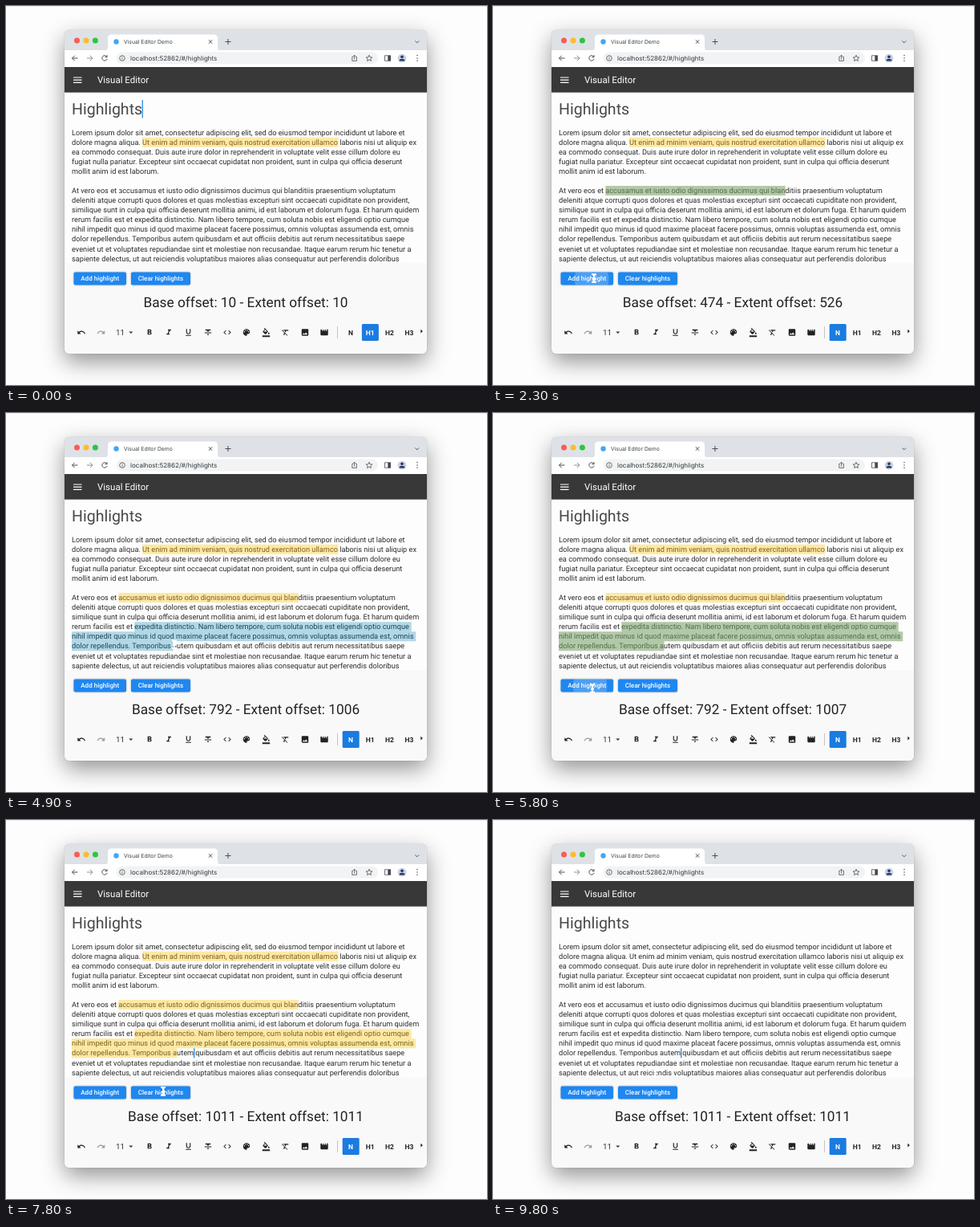
Animation, 600 px wide and 472 px high, one loop 9900 ms. Source, as an HTML page:

```html
<!DOCTYPE html>
<html lang="en">
<head>
<meta charset="utf-8">
<title>Visual Editor Demo</title>
<style>
html, body { margin: 0; width: 100%; height: 100%; overflow: hidden; background: #fdfdfd; }
.window { position: absolute; left: 73px; top: 30px; width: 452px; height: 403px; border-radius: 6px;
  box-shadow: 0 10px 28px rgba(0,0,0,.42), 0 0 1px rgba(0,0,0,.45); }
svg { position: absolute; left: 0; top: 0; }
text { font-family: Roboto, sans-serif; text-rendering: geometricPrecision; white-space: pre; }
.ui { font-family: Inter, sans-serif; }
.line { fill: none; stroke: #4a4d51; stroke-width: 1; }
.mid { text-anchor: middle; }
.btn { font-size: 8.05px; font-weight: 500; fill: #fff; }
.style { font-size: 8.5px; font-weight: 700; }
</style>
</head>
<body>
<div class="window"></div>
<svg width="600" height="472" viewBox="0 0 600 472">
  <defs>
    <clipPath id="frame"><rect x="73" y="30" width="452" height="403" rx="6"/></clipPath>
    <clipPath id="buttons">
      <rect x="84.5" y="331.5" width="65.5" height="16" rx="2"/>
      <rect x="156" y="331.5" width="74" height="16" rx="2"/>
    </clipPath>
  </defs>
  <rect width="600" height="1" fill="#e9edef"/>

  <g clip-path="url(#frame)">
    <rect x="73" y="30" width="452" height="26" fill="#dee1e6"/>
    <rect x="73" y="55" width="452" height="21" fill="#fff"/>
    <rect x="73" y="76" width="452" height="32" fill="#383838"/>
    <rect x="73" y="107.7" width="452" height="213" fill="#fdfdfd"/>
    <rect x="73" y="320" width="452" height="113" fill="#f9f9f9"/>
  </g>

  <!-- Tab strip -->
  <circle cx="88.5" cy="43" r="3.5" fill="#fc5b57"/>
  <circle cx="100" cy="43" r="3.5" fill="#fdbc2e"/>
  <circle cx="111.4" cy="43" r="3.5" fill="#29c73f"/>
  <path d="M122 56q5 0 5-5V40q0-4.500 4.500-4.500h128q4.500 0 4.500 4.500v11q0 5 5 5z" fill="#fff"/>
  <circle cx="137.500" cy="44.500" r="3.200" fill="#42a5f5"/>
  <text class="ui" x="147" y="47" font-size="6.8" fill="#3c4043">Visual Editor Demo</text>
  <path class="line" d="M252.800 42.300l4.400 4.400m0-4.400l-4.400 4.400M273.500 44.500h7m-3.500-3.500v7M510.500 43.500l2.300 2.300 2.300-2.300"/>

  <!-- Address bar -->
  <rect x="137.500" y="57.500" width="326.500" height="15" rx="7.500" fill="#f1f3f4"/>
  <path class="line" d="M89.500 65h-7m3.200-3.200l-3.200 3.200 3.200 3.200M125.800 63.300a3.200 3.200 0 1 0 .3 2.500M126 61.200v2.500h-2.500"/>
  <path class="line" style="stroke:#8e9195" d="M101 65h7m-3.200-3.200l3.200 3.200-3.200 3.200"/>
  <g class="line" style="stroke-width:.8">
    <circle cx="145" cy="65" r="3.300"/>
    <path d="M145 64.500v2.300m0-3.900v.8M433 63.300h-1.200v5h5.600v-5h-1.200M434.600 66.500v-5.300m-1.600 1.600l1.600-1.600 1.600 1.600"/>
    <path d="M453 61.200l1.100 2.600 2.800.2-2.100 1.800.6 2.700-2.400-1.500-2.400 1.500.6-2.700-2.100-1.800 2.800-.2z"/>
    <rect x="472.600" y="61.800" width="7" height="6.400"/>
  </g>
  <rect x="476.300" y="61.800" width="3.500" height="6.400" fill="#44474b"/>
  <circle cx="494" cy="65" r="5.300" fill="#c6d0e6"/>
  <path d="M490.500 68.400q0-2.700 3.500-2.700t3.500 2.700z" fill="#27365c"/>
  <circle cx="494" cy="63.300" r="1.800" fill="#27365c"/>
  <path d="M513 61.500v.01m0 3.400v.01m0 3.400v.01" stroke="#44474b" stroke-width="1.500" stroke-linecap="round"/>
  <text class="ui" x="155" y="67.900" font-size="8" fill="#35383c">localhost:52862/#/highlights</text>

  <!-- App bar -->
  <path d="M84 89h10.500M84 92.200h10.500M84 95.400h10.500" stroke="#fff" stroke-width="1.200"/>
  <text x="114" y="96.200" font-size="11.500" fill="#fff">Visual Editor</text>

  <!-- Document -->
  <text x="82" y="135" font-size="19.550" fill="#484848">Highlights</text>
  <g id="body" font-size="9.200" fill="#2b2b2b"></g>
  <path id="marks" fill="rgba(255,193,7,.36)"/>
  <path id="selection" fill="rgba(0,130,180,.3)"/>
  <rect id="caret" width="1.300" fill="#2489e6"/>

  <!-- Buttons -->
  <g style="filter:drop-shadow(0 .8px .8px rgba(0,0,0,.3))" fill="#1e87f0">
    <rect x="84.500" y="331.500" width="65.500" height="16" rx="2"/>
    <rect x="156" y="331.500" width="74" height="16" rx="2"/>
  </g>
  <g clip-path="url(#buttons)"><circle id="ripple" cy="339.500" fill="#fff"/></g>
  <text class="btn mid" x="117.200" y="342.300">Add highlight</text>
  <text class="btn mid" x="193" y="342.300">Clear highlights</text>
  <text id="offsets" class="mid" x="299" y="375.300" font-size="17.250" fill="#222"></text>

  <!-- Toolbar -->
  <g id="icons" fill="#222"></g>
  <text class="mid" x="142.500" y="410" font-size="9.800" fill="#333">11</text>
  <path d="M153.300 405.500h5l-2.500 2.500z" fill="#333"/>
  <path d="M413.500 399v15" stroke="#c4c4c4"/>
  <rect id="active" y="396" width="21" height="21" rx="1.500" fill="#1a7be0"/>
  <g id="styles" class="style mid"></g>
  <path d="M517.300 402.800l2.600 2.300-2.600 2.300z" fill="#222"/>

  <g id="cursor" fill="none" stroke-linecap="round">
    <path id="beam" d="M-2-4.800q2 0 2 1.500v6.600q0 1.500-2 1.500M2-4.800q-2 0-2 1.500v6.600q0 1.500 2 1.500M-1.200.8h2.400" stroke="#fff" stroke-width="2"/>
    <use href="#beam" style="stroke:#111"/>
  </g>
</svg>

<script>
const $ = id => document.getElementById(id);
const LOOP = 9900, LEFT = 82, TOP = 151.6, PITCH = 12.06;

const lines = `Lorem ipsum dolor sit amet, consectetur adipiscing elit, sed do eiusmod tempor incididunt ut labore et
dolore magna aliqua. Ut enim ad minim veniam, quis nostrud exercitation ullamco laboris nisi ut aliquip ex
ea commodo consequat. Duis aute irure dolor in reprehenderit in voluptate velit esse cillum dolore eu
fugiat nulla pariatur. Excepteur sint occaecat cupidatat non proident, sunt in culpa qui officia deserunt
mollit anim id est laborum.${' '}

At vero eos et accusamus et iusto odio dignissimos ducimus qui blanditiis praesentium voluptatum
deleniti atque corrupti quos dolores et quas molestias excepturi sint occaecati cupiditate non provident,
similique sunt in culpa qui officia deserunt mollitia animi, id est laborum et dolorum fuga. Et harum quidem
rerum facilis est et expedita distinctio. Nam libero tempore, cum soluta nobis est eligendi optio cumque
nihil impedit quo minus id quod maxime placeat facere possimus, omnis voluptas assumenda est, omnis
dolor repellendus. Temporibus autem quibusdam et aut officiis debitis aut rerum necessitatibus saepe
eveniet ut et voluptates repudiandae sint et molestiae non recusandae. Itaque earum rerum hic tenetur a
sapiente delectus, ut aut reiciendis voluptatibus maiores alias consequatur aut perferendis doloribus`.split('\n');

// Document offset at which each row starts; the heading takes the first 11.
let next = 11;
const rows = lines.map((text, i) => {
  const row = { text: text + ' ', start: next, y: TOP + i * PITCH };
  next += text.length + 1;
  return row;
});
$('body').innerHTML = rows.map(r => `<text x="${LEFT}" y="${r.y + 9.2}">${r.text}</text>`).join('');

const pen = document.createElement('canvas').getContext('2d');
pen.font = '92px Roboto, sans-serif';
const xAt = (row, col) => LEFT + pen.measureText(row.text.slice(0, col)).width / 10;

function offsetAt(x, y) {
  const row = rows[Math.max(0, Math.min(rows.length - 1, Math.floor((y - TOP) / PITCH)))];
  let col = 0;
  while (col < row.text.length - 1 && (xAt(row, col) + xAt(row, col + 1)) / 2 < x) col++;
  return row.start + col;
}

function spans(from, to) {
  return rows.map(row => {
    const a = Math.max(from - row.start, 0), b = Math.min(to - row.start, row.text.length);
    if (a >= b) return '';
    const x = xAt(row, a);
    return `M${x} ${row.y}h${xAt(row, b) - x}v${PITCH}H${x}z`;
  }).join('');
}

// Toolbar icons on a 24-unit grid: centre x, path
const undo = 'M12.5 8c-2.65 0-5.05 1-6.900 2.600L2 7v9h9l-3.620-3.620c1.390-1.160 3.160-1.880 5.120-1.880 3.540 0 6.550 2.310 7.600 5.500l2.370-.78C21.080 11.030 17.150 8 12.500 8z';
const dot = (x, y) => `M${x - 1.5} ${y}a1.500 1.500 0 1 0 3 0a1.500 1.500 0 1 0-3 0z`;
const icons = [
  [94, undo],
  [179, 'M15.600 10.800c1-.7 1.650-1.800 1.650-2.800 0-2.260-1.750-4-4-4H7v14h7c2.100 0 3.750-1.700 3.750-3.800 0-1.500-.86-2.800-2.150-3.400zM10 6.500h3a1.500 1.500 0 0 1 0 3h-3zm3.500 9H10v-3h3.500a1.500 1.500 0 0 1 0 3z'],
  [203, 'M10 4v3h2.200l-3.400 8H6v3h8v-3h-2.200l3.400-8H18V4z'],
  [227.5, 'M12 17c3.300 0 6-2.700 6-6V3h-2.500v8a3.500 3.500 0 0 1-7 0V3H6v8c0 3.300 2.700 6 6 6zm-7 2v2h14v-2z'],
  [252, 'M10 19h4v-3h-4zM5 4v3h5v3h4V7h5V4zM3 14h18v-2H3z'],
  [276, 'M9.400 16.600L4.800 12l4.600-4.600L8 6l-6 6 6 6zm5.200 0l4.600-4.600-4.600-4.600L16 6l6 6-6 6z'],
  [300, 'M12 3a9 9 0 0 0 0 18c.8 0 1.500-.7 1.500-1.500 0-.4-.15-.75-.4-1-.9-1-.1-2.500 1.100-2.500H16c2.760 0 5-2.240 5-5 0-4.420-4-8-9-8z'
    + dot(6.5, 10.5) + dot(9.5, 6.5) + dot(14.5, 6.5) + dot(17.5, 10.5)],
  [324.5, 'M16.560 8.940L7.620 0 6.200 1.400l2.400 2.400-5.160 5.140c-.6.6-.6 1.540 0 2.120l5.500 5.500c.6.600 1.540.600 2.120 0l5.500-5.500c.6-.6.6-1.540 0-2.120zM5.200 10L10 5.200 14.800 10zM19 11.500s-2 2.200-2 3.500a2 2 0 0 0 4 0c0-1.300-2-3.500-2-3.500zM2 20h20v4H2z'],
  [348.5, 'M3.270 5L2 6.270l6.970 6.970L6.500 19h3l1.570-3.660L16.730 21 18 19.730zM6 5v.2L8.800 8h2.400l-.7 1.700 2.100 2.100L14.200 8H20V5z'],
  [373, 'M21 19V5a2 2 0 0 0-2-2H5a2 2 0 0 0-2 2v14c0 1.100.9 2 2 2h14a2 2 0 0 0 2-2zM8.500 13.500l2.500 3 3.500-4.500 4.500 6H5z'],
  [397, 'M18 4l2 4h-3l-2-4h-2l2 4h-3l-2-4H8l2 4H7L5 4H4a2 2 0 0 0-2 2v12c0 1.100.9 2 2 2h16a2 2 0 0 0 2-2V4z'],
];
const place = (x, path, flip = 1, fill = '#222') =>
  `<path d="${path}" fill="${fill}" fill-rule="evenodd" transform="translate(${x} 406.500) scale(${flip * .47} .47) translate(-12 -12)"/>`;
$('icons').innerHTML = icons.map(([x, path]) => place(x, path)).join('') + place(118.5, undo, -1, '#9b9b9b');

const styleX = { N: 430, H1: 454.2, H2: 478.5, H3: 503 };
$('styles').innerHTML = Object.entries(styleX).map(([name, x]) => `<text x="${x}" y="409.600">${name}</text>`).join('');

// Pointer path: time, x, y
const path = [
  [0, 140, 230], [300, 140, 230], [1100, 365, 231], [1300, 365, 231], [2000, 126, 339], [2500, 126, 339],
  [3400, 260, 266], [3700, 260, 266], [4000, 232, 266], [4300, 160.5, 266], [4400, 160.5, 266], [5000, 214, 290],
  [5200, 214, 290], [5600, 124, 343], [5900, 124, 343], [6300, 235, 292], [6600, 236, 299], [6900, 236, 299],
  [7900, 195, 339], [8900, 195, 339], [9800, 203, 315], [LOOP, 203, 315],
];
// Selection changes: time, base, extent (no extent: it follows the pointer)
const selections = [
  [0, 10, 10], [100, 474, 474], [300, 474], [1100, 474, 526], [3500, 816, 816],
  [4300, 792], [5000, 792, 1007], [6400, 1011, 1011],
];
const CLEARED = 8300;
const marks = [[0, 135, 193], [2200, 474, 526], [5700, 792, 1007]];
const clicks = [[2150, 123], [5650, 121], [8250, 194]];

function pointer(t) {
  const i = path.findIndex(p => p[0] > t);
  const [t0, x0, y0] = path[i - 1], [t1, x1, y1] = path[i];
  const u = (t - t0) / (t1 - t0), e = u * u * (3 - 2 * u);
  return [x0 + (x1 - x0) * e, y0 + (y1 - y0) * e];
}

function set(id, attrs) {
  for (const name in attrs) $(id).setAttribute(name, attrs[name]);
}

function draw(t) {
  const [x, y] = pointer(t);
  set('cursor', { transform: `translate(${x} ${y})` });

  const [, base, end] = selections.findLast(s => s[0] <= t);
  const extent = end ?? Math.max(base, offsetAt(x, y));
  $('offsets').textContent = `Base offset: ${base} - Extent offset: ${extent}`;
  set('selection', { d: spans(base, extent) });
  set('marks', { d: t < CLEARED ? marks.filter(m => m[0] <= t).map(m => spans(m[1], m[2])).join('') : '' });

  const heading = base < 11;
  const row = rows.findLast(r => r.start <= base);
  set('caret', {
    x: heading ? 169.6 : xAt(row, base - row.start) - .4,
    y: heading ? 117 : row.y,
    height: heading ? 22.5 : PITCH,
    opacity: base === extent ? 1 : 0,
  });

  const style = heading ? 'H1' : 'N';
  set('active', { x: styleX[style] - 10.3 });
  for (const label of $('styles').children)
    label.setAttribute('fill', label.textContent === style ? '#fff' : '#222');

  const click = clicks.find(c => t >= c[0] && t < c[0] + 500);
  const age = click ? t - click[0] : 0;
  set('ripple', {
    cx: click ? click[1] : 0,
    r: click ? 8 + age * .09 : 0,
    opacity: .2 * Math.min(1, (500 - age) / 250),
  });
}

const start = performance.now();
function tick() {
  const t = (performance.now() - start) % LOOP;
  draw(Math.floor(t / 100) * 100);
  requestAnimationFrame(tick);
}
tick();
</script>
</body>
</html>
```
